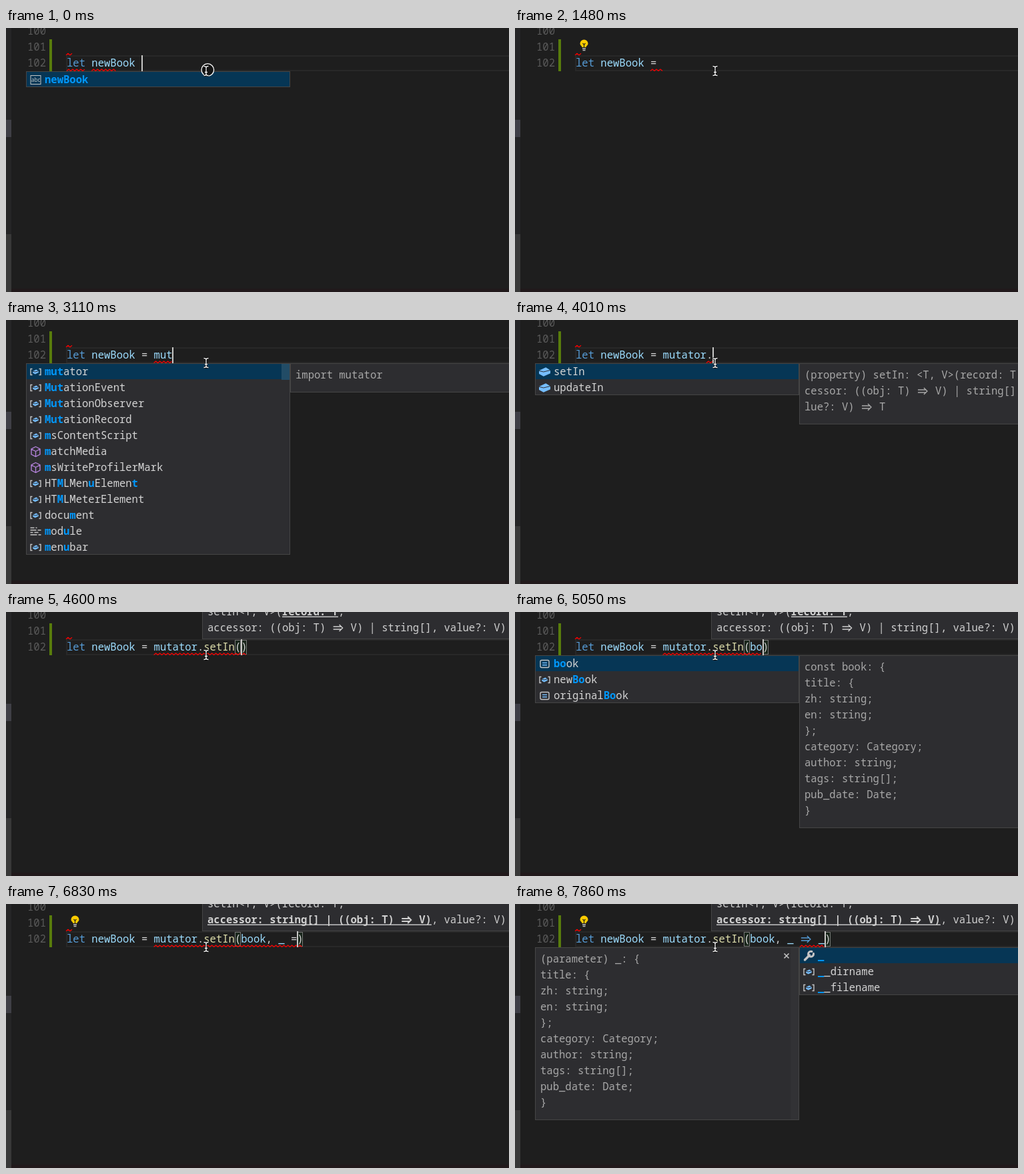
These frames come from a looping animation (754x397 px, 8000 ms). An HTML page with a canvas:

```html
<!DOCTYPE html>
<html lang="en">
<head>
<meta charset="utf-8">
<title>Code completion</title>
<style>
  html, body { margin: 0; width: 100%; height: 100%; overflow: hidden; background: #1e1e1e; }
  canvas { display: block; }
</style>
</head>
<body>
<canvas id="stage" width="754" height="397"></canvas>
<script>
const ctx = document.getElementById('stage').getContext('2d');
const LOOP = 8000, SIZE = 15.55, CELL = SIZE * 0.6, LEFT = 91, LINE = 24;
const BLUE = '#75beff', GREY = '#c5c5c5', PANEL = '#2d2d30', EDGE = '#454545';

// Completion lists: "icon label" rows; icons are drawn by the table below
const lists = {
  word: ['a newBook'],
  m: ['v marked', 'm matchMedia', 'v menubar', 'v mocha', 'M module', 'v module', 'm moveBy', 'm moveTo',
    'v msContentScript', 'v msCredentials', 'm msWriteProfilerMark', 'v mutator'],
  mu: ['v mutator', 'v menubar', 'M module', 'v module', 'v MutationEvent', 'v MutationObserver',
    'v MutationRecord', 'v msContentScript', 'm matchMedia', 'v HTMLMenuElement', 'v HTMLMeterElement', 'v document'],
  mut: ['v mutator', 'v MutationEvent', 'v MutationObserver', 'v MutationRecord', 'v msContentScript',
    'm matchMedia', 'm msWriteProfilerMark', 'v HTMLMenuElement', 'v HTMLMeterElement', 'v document', 'M module', 'v menubar'],
  members: ['f setIn', 'f updateIn'],
  book: ['c book', 'v newBook', 'c originalBook'],
  under: ['v __dirname', 'v __filename', 'a pub_date'],
  param: ['w _', 'v __dirname', 'v __filename']
};
const shape = ['title: {', 'zh: string;', 'en: string;', '};', 'category: Category;', 'author: string;',
  'tags: string[];', 'pub_date: Date;', '}'];
const docs = {
  marked: ['export namespace marked'],
  mutator: ['import mutator'],
  setIn: ['(property) setIn: <T, V>(record: T, ac', 'cessor: ((obj: T) => V) | string[], va', 'lue?: V) => T'],
  book: ['const book: {', ...shape],
  dirname: ['var __dirname: string'],
  param: ['(parameter) _: {', ...shape]
};

const A = 'let newBook ', B = A + '= ', C = B + 'mutator', D = C + '.setIn';
const call = args => `${D}(${args})`;
// Each step changes part of the editor state
const steps = [
  [0, { code: A, bad: [[0, 3], [4, 8]], list: 'word', query: 'newBook', doc: '', sig: 0, bulb: 0, ring: 1, caret: 1 }],
  [150, { ring: 0 }],
  [300, { code: A + '=', list: '' }],
  [450, { bad: [] }],
  [600, { bad: [[12, 13]] }],
  [740, { code: B }],
  [890, { bad: [[12, 14]] }],
  [1030, { bulb: 1 }],
  [1480, { caret: 0 }],
  [1920, { caret: 1 }],
  [2370, { code: B + 'm' }],
  [2520, { list: 'm', query: 'm', doc: 'marked' }],
  [2660, { code: B + 'mu', bulb: 0 }],
  [2820, { list: 'mu', query: 'mu', doc: 'mutator', bad: [[14, 16]] }],
  [2960, { code: B + 'mut' }],
  [3110, { list: 'mut', query: 'mut', bad: [[14, 17]] }],
  [3410, { code: C, list: '', doc: '' }],
  [3560, { bad: [] }],
  [3860, { code: C + '.' }],
  [4010, { list: 'members', query: '', doc: 'setIn', bad: [[21, 22]] }],
  [4160, { code: D, list: '', doc: '' }],
  [4310, { bad: [] }],
  [4450, { code: call('') }],
  [4600, { sig: 1, bad: [[14, 29]] }],
  [4900, { code: call('b') }],
  [5050, { code: call('bo'), list: 'book', query: 'bo', doc: 'book', bad: [[14, 30]] }],
  [5200, { code: call('boo'), query: 'boo', bulb: 1 }],
  [5350, { code: call('book'), query: 'book', bad: [[14, 33]] }],
  [5500, { sig: 2 }],
  [5650, { code: call('book,'), bad: [[14, 34]] }],
  [5790, { list: '', doc: '', sig: 3 }],
  [5940, { code: call('book, '), bad: [[14, 35]] }],
  [6090, { code: call('book, _') }],
  [6240, { list: 'under', query: '_', doc: 'dirname', bulb: 0 }],
  [6390, { code: call('book, _ '), list: '', doc: '' }],
  [6530, { bad: [[14, 37]], bulb: 1 }],
  [6680, { code: call('book, _ =') }],
  [6830, { bad: [[14, 38]] }],
  [6970, { code: call('book, _ =>') }],
  [7120, { bad: [[36, 38]] }],
  [7270, { code: call('book, _ => '), bulb: 0 }],
  [7420, { bad: [[36, 39]], bulb: 1 }],
  [7570, { code: call('book, _ => _') }],
  [7710, { list: 'param', query: '_', bad: [[36, 40]] }],
  [7860, { doc: 'param' }]
];

const rect = (x, y, w, h, color) => { ctx.fillStyle = color; ctx.fillRect(x, y, w, h); };
const frame = (x, y, w, h, color) => { ctx.strokeStyle = color; ctx.lineWidth = 1; ctx.strokeRect(x + .5, y + .5, w - 1, h - 1); };
const path = (d, color, width = 1.4) => {
  ctx.strokeStyle = color; ctx.lineWidth = width; ctx.stroke(new Path2D(d));
};
const fill = (d, color) => { ctx.fillStyle = color; ctx.fill(new Path2D(d)); };
const at = (x, y, draw) => { ctx.save(); ctx.translate(x, y); draw(); ctx.restore(); };

// Monospaced text in which "=>" becomes a two-cell arrow
function text(s, x, y, color, weight = 400) {
  ctx.font = `${weight} ${SIZE}px "Noto Sans Mono", "DejaVu Sans Mono", monospace`;
  for (const part of s.split(/(=>)/)) {
    if (part === '=>') at(x, y - 5, () => path('M2-2H14M2 2H14M11-5 16 0 11 5', color, weight > 400 ? 2 : 1.4));
    else { ctx.fillStyle = color; ctx.fillText(part, x, y); }
    x += part.length * CELL;
  }
  return x;
}

function squiggle(x, y, end) {
  ctx.beginPath();
  for (let i = 0; x + i <= end; i += 3) ctx.lineTo(x + i, y + (i % 2 ? -1.2 : 1.2));
  ctx.strokeStyle = '#f00'; ctx.lineWidth = 1.2; ctx.stroke();
}

function cube(size) {
  const s = size, h = s / 2;
  fill(`M${-s} ${-h * .5} ${s * .2} ${-s * .8} ${s}${-h * .6} ${s} ${h * .5} ${-s * .2} ${s * .8} ${-s} ${h * .7}Z`, BLUE);
  path(`M${-s} ${-h * .4} ${-s * .2} 0 ${s} ${-h * .6}`, PANEL, 1);
}

const icons = {
  v() { path('M-5-4.5H-7.5V4.5H-5M5-4.5H7.5V4.5H5', GREY); cube(4.3); },
  m() { path('M0-7.5 6.5-4V4L0 7.5-6.5 4V-4ZM-6.5-4 0-.5 6.5-4M0-.5V7.5', '#b180d7'); },
  M() { path('M-8-5.5H-2M0-5.5H2M-8-2H1M3-2H8M-8 1.5H-4M-2 1.5H4M-8 5H2M4 5H8', GREY, 1.6); },
  f() { cube(8.5); },
  c() {
    ctx.beginPath(); ctx.roundRect(-6.5, -5.5, 13, 11, 2);
    ctx.strokeStyle = GREY; ctx.lineWidth = 1.4; ctx.stroke();
    path('M-3.5-1.5H3.5M-3.5 1.8H3.5', BLUE);
  },
  a() {
    frame(-8, -7, 16, 14, GREY);
    ctx.font = '8px "Noto Sans", sans-serif'; ctx.fillStyle = GREY; ctx.fillText('abc', -6.5, 3);
  },
  w() {
    ctx.lineCap = 'round';
    path('M-6 6 1-1', GREY, 3.5);
    path('M4.5-6.5A4 4 0 1 0 7-3.5', GREY, 3);
  }
};

function drawCode({ code, bad, caret }) {
  ctx.strokeStyle = '#282828'; ctx.lineWidth = 2;
  ctx.strokeRect(LEFT, 42, 700, 22);
  const col = code.endsWith(')') ? code.length - 1 : code.length;
  const open = code.indexOf('(');
  if (open >= 0 && (col === open + 1 || code.endsWith(')'))) {
    for (const i of [open, code.length - 1]) {
      rect(LEFT + i * CELL, 42, CELL, 22, '#18251a');
      frame(Math.round(LEFT + i * CELL), 42, 9, 22, '#777');
    }
  }
  for (const m of code.matchAll(/=>|\w+|\S/g)) {
    const word = m[0];
    const color = word === 'let' || word === '=>' ? '#569cd6'
      : !/\w/.test(word) ? '#d4d4d4'
      : code[m.index + word.length] === '(' ? '#dcdcaa' : '#9cdcfe';
    text(word, LEFT + m.index * CELL, 58, color);
  }
  squiggle(90, 39.5, 100);
  for (const [from, to] of bad) squiggle(LEFT + from * CELL, 63.3, LEFT + to * CELL);
  if (caret) rect(Math.round(LEFT + col * CELL - .4), 41, 2, 24, '#c8c8c6');
}

function drawBulb() {
  rect(97, 18, 14, 18, '#1e1e1e');
  at(103.5, 24, () => {
    fill('M-3 5C-3 3-6 2-6-.5A6 6 0 0 1 6-.5C6 2 3 3 3 5Z', '#fc0');
    path('M-2-1 0 1 2-1M0 1V5', '#1e1e1e', 1.2);
    path('M-2.5 7H2.5M-2 9.5H2', GREY, 1.6);
  });
}

function drawList({ list, query }) {
  const rows = lists[list], x = list === 'param' ? 426 : 30, h = rows.length * LINE;
  ctx.save();
  ctx.beginPath(); ctx.rect(x, 65, 396, h); ctx.clip();
  rect(x, 65, 396, h, PANEL);
  rect(x, 66, 396, LINE - 1, '#063655');
  if (rows.length === 12) rect(413, 66, 12, LINE, '#224c66');
  rows.forEach((row, r) => {
    const y = 78 + r * LINE;
    at(x + 14.5, y, icons[row[0]]);
    let tx = x + 28, hit = 0;
    for (const ch of row.slice(2)) {
      const match = hit < query.length && ch.toLowerCase() === query[hit].toLowerCase();
      if (match) hit++;
      tx = text(ch, tx, y + 5, match ? '#0097fb' : '#d4d4d4', match ? 700 : 400);
    }
  });
  frame(x, 65, 396, h, EDGE);
  ctx.restore();
}

function drawDoc(name) {
  const left = name === 'param', x = left ? 30 : 426, h = docs[name].length * LINE + 20;
  rect(x, 65, 396, h, PANEL);
  docs[name].forEach((line, i) => text(line, x + 8, 88 + i * LINE, '#a8a8a8'));
  if (left) {
    rect(413, 66, 12, h - 2, '#323235');
    path('M403.5 74.5 410.5 81.5M410.5 74.5 403.5 81.5', GREY, 1.6);
  }
  frame(x, 65, 396, h, EDGE);
}

function drawSignature(sig) {
  rect(294, 0, 460, 41, PANEL);
  rect(294, 0, 1, 41, EDGE);
  rect(294, 40, 460, 1, EDGE);
  const part = (s, x, y, strong) => {
    const end = text(s, x, y, '#d0d0d0', strong ? 700 : 400);
    if (strong) rect(x, y + 1.5, end - x, 1.4, '#d0d0d0');
    return end;
  };
  let x = part('setIn<T, V>(', 302, 5);
  x = part('record: T', x, 5, sig < 3);
  part(',', x, 5);
  x = part(sig === 1 ? 'accessor: ((obj: T) => V) | string[]' : 'accessor: string[] | ((obj: T) => V)', 302, 29, sig === 3);
  part(', value?: V)', x, 29);
}

function drawMouse(ring) {
  if (ring) {
    ctx.beginPath(); ctx.arc(302.3, 63, 9.3, 0, 7);
    ctx.fillStyle = '#151515'; ctx.fill();
    ctx.strokeStyle = '#fff'; ctx.lineWidth = 1.3; ctx.stroke();
  }
  at(300, 64.5, () => {
    const beam = 'M-3.5-7Q0-7 0-5Q0-7 3.5-7M0-5V5M-3.5 7Q0 7 0 5Q0 7 3.5 7M-2 2H2';
    path(beam, '#000', 3);
    path(beam, '#fff', 1.3);
  });
}

function draw(t) {
  const s = Object.assign({}, ...steps.filter(([time]) => time <= t).map(([, change]) => change));
  rect(0, 0, 754, 397, '#1e1e1e');
  rect(0, 0, 8, 397, '#252526');
  rect(0, 138, 8, 26, '#3f3f46');
  rect(0, 310, 8, 87, '#383838');
  rect(8, 392, 746, 5, '#21191b');
  ['100', '101', '102'].forEach((n, i) => text(n, 32, 10 + i * LINE, '#5a5a5a'));
  rect(65, 17, 4, 48, '#587c0c');
  drawCode(s);
  if (s.bulb) drawBulb();
  if (s.sig) drawSignature(s.sig);
  if (s.doc) drawDoc(s.doc);
  if (s.list) drawList(s);
  drawMouse(s.ring);
}

const start = performance.now();
(function tick() {
  draw((performance.now() - start) % LOOP);
  requestAnimationFrame(tick);
})();
</script>
</body>
</html>
```
